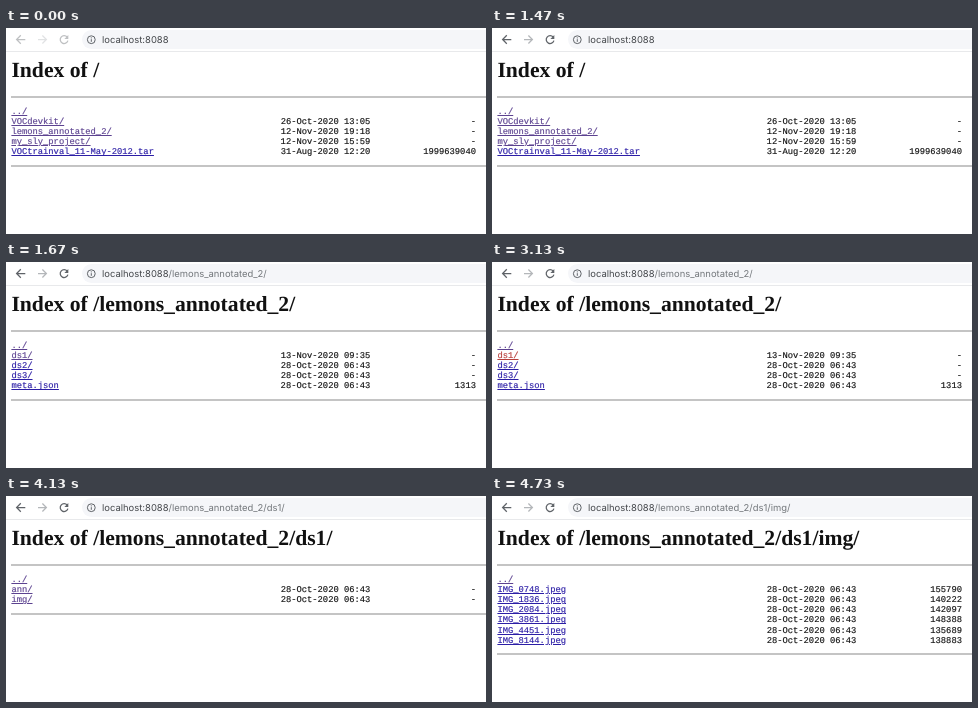
These frames come from a looping animation (480 by 206 pixels, 6.19 s). An HTML page:

```html
<!DOCTYPE html>
<html lang="en">
<head>
<meta charset="utf-8">
<title>Directory listing</title>
<style>
html, body { margin: 0; width: 100%; height: 100%; overflow: hidden; background: #fff; }
body { position: relative; text-rendering: geometricPrecision; }

.bar { position: absolute; inset: 0 0 auto; height: 23px; background: #fff; border-bottom: 1px solid #e8e9eb; }
.pill { position: absolute; left: 76px; top: 2px; width: 440px; height: 19px; border-radius: 9.5px; background: #f5f6f9; }
.bar svg { position: absolute; left: 0; top: 0; width: 100px; height: 23px; fill: none; stroke-width: 1.25; }
.nav { stroke: #5f6368; }
.nav .off { stroke: #b4b7ba; }
.url { position: absolute; left: 96px; top: 2.5px; font: 9.45px/19px Inter, Roboto, sans-serif; color: #45484c; white-space: pre; }
.url i { font-style: normal; color: #73777b; }

.page { position: absolute; left: 5.4px; top: 29.6px; width: 490px; color: #111; }
h1 { margin: 0; font: bold 21.65px/25px "Liberation Serif", "Times New Roman", serif; white-space: pre; }
hr { margin: 0; border: 0; height: 2px; background: #c4c4c4; }
h1 + hr { margin-top: 13.4px; }
pre { margin: 8.8px 0 7.6px; font: 8.8px/10.15px "Liberation Mono", "Courier New", monospace; -webkit-text-stroke: .15px; }
a { color: #2c1ea6; text-decoration: underline; }
a.seen { color: #5c4290; }

/* One loop, hard cuts only */
.nav, .page, .url, .stop, .reload, .hit { animation: 6190ms step-end infinite; }
.page, .url, .stop { visibility: hidden; }
.nav { animation-name: focus; }
#page0, #url0 { animation-name: first; }
#page1 { animation-name: page1; }
#page2 { animation-name: page2; }
#page3 { animation-name: page3; }
#url1 { animation-name: url1; }
#url2 { animation-name: url2; }
#url3 { animation-name: url3; }
.stop { animation-name: stop; }
.reload { animation-name: reload; }
#page0 .hit { animation-name: hit0; }
#page1 .hit { animation-name: hit1; }
#page2 .hit { animation-name: hit2; }

@keyframes focus { 0% { opacity: .4; } 14.05%, 100% { opacity: 1; } }
@keyframes first { 0% { visibility: visible; } 24.71% { visibility: hidden; } }
@keyframes page1 { 24.71% { visibility: visible; } 52.82% { visibility: hidden; } }
@keyframes page2 { 52.82% { visibility: visible; } 76.41% { visibility: hidden; } }
@keyframes page3 { 76.41%, 100% { visibility: visible; } }
@keyframes url1 { 24.71% { visibility: visible; } 51.69% { visibility: hidden; } }
@keyframes url2 { 51.69% { visibility: visible; } 75.44% { visibility: hidden; } }
@keyframes url3 { 75.44%, 100% { visibility: visible; } }
@keyframes stop {
  24.71%, 51.69%, 75.44% { visibility: visible; }
  26.97%, 53.79%, 76.41% { visibility: hidden; }
}
@keyframes reload {
  24.71%, 51.69%, 75.44% { visibility: hidden; }
  26.97%, 53.79%, 76.41% { visibility: visible; }
}
@keyframes hit0 { 22.61% { color: #c8322f; } 23.74% { color: #5c4290; } }
@keyframes hit1 { 50.56% { color: #b8403c; } 51.69% { color: #5c4290; } }
@keyframes hit2 { 73.18% { color: #b8403c; } 75.44% { color: #5c4290; } }
</style>
</head>
<body>
<div class="bar">
  <div class="pill"></div>
  <svg viewBox="0 0 100 23">
    <g class="nav">
      <path d="M19.3 11.5H10.8M14.8 7.3l-4.2 4.2 4.2 4.2"/>
      <path class="off" d="M32 11.5h8.2M36.4 7.5l4 4-4 4"/>
      <g class="reload">
        <path d="M61.2 9.2A3.9 3.9 0 1 0 61.9 12.6"/>
        <path d="M62.3 7v3.9h-3.9z" fill="#5f6368" stroke="none"/>
      </g>
      <path class="stop" d="M54.8 8.3l6.4 6.4M61.2 8.3l-6.4 6.4"/>
    </g>
    <g stroke="#5f6368" stroke-width="1">
      <circle cx="85.3" cy="11.7" r="3.9"/>
      <path d="M85.3 11.2v2.6M85.3 9.4v1"/>
    </g>
  </svg>
</div>
<script>
const host = "localhost:8088";
const oct = "28-Oct-2020 06:43";
// Rows: name, date, size, link class
const pages = [
  ["/", [
    ["VOCdevkit/", "26-Oct-2020 13:05", "-", "seen"],
    ["lemons_annotated_2/", "12-Nov-2020 19:18", "-", "seen hit"],
    ["my_sly_project/", "12-Nov-2020 15:59", "-", "seen"],
    ["VOCtrainval_11-May-2012.tar", "31-Aug-2020 12:20", "1999639040", ""]
  ]],
  ["/lemons_annotated_2/", [
    ["ds1/", "13-Nov-2020 09:35", "-", "seen hit"],
    ["ds2/", oct, "-", ""],
    ["ds3/", oct, "-", ""],
    ["meta.json", oct, "1313", ""]
  ]],
  ["/lemons_annotated_2/ds1/", [
    ["ann/", oct, "-", "seen"],
    ["img/", oct, "-", "seen hit"]
  ]],
  ["/lemons_annotated_2/ds1/img/", [
    ["IMG_0748.jpeg", oct, "155790", ""],
    ["IMG_1836.jpeg", oct, "140222", ""],
    ["IMG_2084.jpeg", oct, "142097", ""],
    ["IMG_3861.jpeg", oct, "148388", ""],
    ["IMG_4451.jpeg", oct, "135689", ""],
    ["IMG_8144.jpeg", oct, "138883", ""]
  ]]
];

const row = ([name, date, size, cls]) =>
  `<a class="${cls}">${name}</a>` + " ".repeat(51 - name.length) + date + size.padStart(20);

const bar = document.querySelector(".bar");
pages.forEach(([path, rows], i) => {
  const tail = path === "/" ? "" : path;
  const list = ['<a class="seen">../</a>', ...rows.map(row)].join("\n");
  bar.insertAdjacentHTML("beforeend",
    `<div class="url" id="url${i}">${host}<i>${tail}</i></div>`);
  document.body.insertAdjacentHTML("beforeend",
    `<div class="page" id="page${i}"><h1>Index of ${path}</h1><hr><pre>${list}</pre><hr></div>`);
});
</script>
</body>
</html>
```
